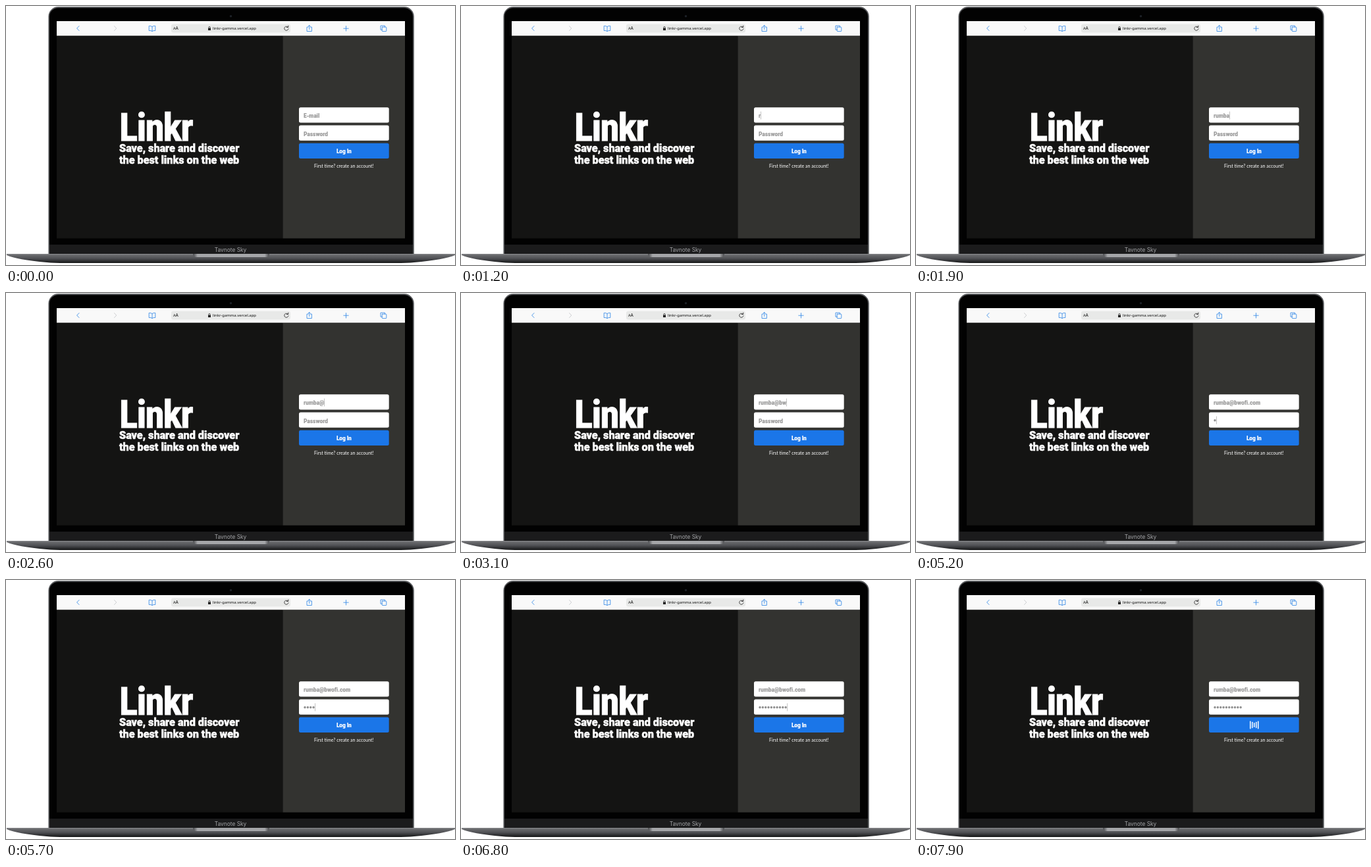
Animation, 682 px wide and 394 px high, one loop 8000 ms. Source, as an HTML page:

```html
<!DOCTYPE html>
<html lang="en">
<head>
<meta charset="utf-8">
<title>Log in</title>
<style>
  html, body { margin: 0; width: 100%; height: 100%; overflow: hidden; background: #fff; }
  svg { display: block; width: 100vw; height: 100vh; }
  .narrow { font-family: "Roboto Condensed", Roboto, sans-serif; font-stretch: 75%; font-weight: 700; }
  .title { font-size: 59px; letter-spacing: -1.8px; fill: #fff; stroke: #fff; stroke-width: .9; }
  .tagline { font: 900 16.2px Roboto, sans-serif; fill: #fff; stroke: #fff; stroke-width: .5; }
  .field { font-size: 9.7px; letter-spacing: -.1px; fill: #9b9b9b; stroke: #9b9b9b; stroke-width: .15; }
  .button { font-size: 9.7px; letter-spacing: -.2px; fill: #fff; stroke: #fff; stroke-width: .2; text-anchor: middle; }
  .link { font: 7.03px Lato, sans-serif; fill: #fff; text-anchor: middle; }
  .address { font: 500 5.95px "Noto Sans", sans-serif; fill: #111; }
  .model { font: 8.4px Inter, sans-serif; fill: #a2a3a6; text-anchor: middle; }
  .icon { fill: none; stroke: #3f8fe8; stroke-width: .9; stroke-linecap: round; stroke-linejoin: round; }
</style>
</head>
<body>
<svg viewBox="0 0 682 394">
  <defs>
    <linearGradient id="metal" x2="0" y2="1">
      <stop offset="0" stop-color="#8b8c8f"/>
      <stop offset=".15" stop-color="#67686b"/>
      <stop offset=".5" stop-color="#505155"/>
      <stop offset="1" stop-color="#141516"/>
    </linearGradient>
    <linearGradient id="notch">
      <stop offset="0" stop-color="#444548"/>
      <stop offset=".06" stop-color="#a5a6a9"/>
      <stop offset=".94" stop-color="#a5a6a9"/>
      <stop offset="1" stop-color="#444548"/>
    </linearGradient>
  </defs>

  <!-- Laptop -->
  <path d="M64.4 378V16A15 15 0 0 1 79.4 1H604.8A15 15 0 0 1 619.8 16V378Z" fill="#55575a"/>
  <path d="M66 378V16A13 13 0 0 1 79 3H605A13 13 0 0 1 618 16V378Z" fill="#020202"/>
  <rect x="66" y="363" width="552" height="14" fill="#1b1b1c"/>
  <circle cx="341.5" cy="15.5" r="1.7" fill="#1c2026"/>
  <text class="model" x="341" y="373.6">Tavnote Sky</text>
  <path d="M1 377H682V379Q666 386 620 390Q610 391 590 391H92Q72 391 62 390Q16 386 1 379Z" fill="url(#metal)"/>
  <path d="M284 377H400Q400 382 394 382H290Q284 382 284 377Z" fill="url(#notch)"/>

  <!-- Browser bar -->
  <rect x="77" y="23" width="529" height="22.5" fill="#f9f9f9"/>
  <rect x="251" y="27.5" width="181" height="13" rx="3" fill="#e8e9e8"/>
  <text class="address" x="254" y="36.3"><tspan font-size="5.6">A</tspan><tspan font-size="6.6">A</tspan></text>
  <path d="M307 33.5h4v3.5h-4z" fill="#222"/>
  <path class="icon" d="M307.8 33.5v-1a1.2 1.2 0 0 1 2.4 0v1" style="stroke:#222;stroke-width:.7"/>
  <text class="address" x="314" y="36.2">linkr-gamma.vercel.app</text>
  <path class="icon" d="M428.3 32.2A3.1 3.1 0 1 0 428.9 34.8M426.2 32.4H428.7V30" style="stroke:#333"/>
  <path class="icon" d="M111 30.5L107.6 34L111 37.5"/>
  <path class="icon" d="M164.5 30.5L167.8 34L164.5 37.5" style="stroke:#c9cbcd"/>
  <path class="icon" d="M222 31.5Q220 29.8 217.2 30.3V37.5Q220 37 222 38.5Q224 37 226.8 37.5V30.3Q224 29.8 222 31.5V38.5"/>
  <path class="icon" d="M459 32H457V38.5H464.4V32H462.4M460.7 35.5V29.5M459 31L460.7 29.3L462.4 31"/>
  <path class="icon" d="M516.5 30.5V38M512.8 34.2H520.2"/>
  <path class="icon" d="M571.2 36.2H569V30H575.5V32"/>
  <rect class="icon" x="571.2" y="32" width="6.6" height="6.6" rx=".8"/>

  <!-- Page -->
  <rect x="77" y="45.5" width="343.5" height="308" fill="#141413"/>
  <rect x="420.5" y="45.5" width="185.5" height="308" fill="#333330"/>
  <text class="narrow title" x="172" y="205">Linkr</text>
  <text class="tagline" x="172" y="222">Save, share and discover</text>
  <text class="tagline" x="172" y="239.5">the best links on the web</text>

  <rect x="445" y="154.3" width="136.7" height="23.2" rx="2.5" fill="#fff"/>
  <rect x="445" y="181.5" width="136.7" height="23.2" rx="2.5" fill="#fff"/>
  <rect x="445" y="208.7" width="136.7" height="23.2" rx="2.5" fill="#1b76e8"/>
  <text id="email" class="narrow field" x="452" y="170.3"></text>
  <text id="password" class="narrow field" x="452" y="197.5">Password</text>
  <g id="dots" fill="#8f8f8f"></g>
  <rect id="caret" width=".6" height="12" fill="#999"/>
  <text id="login" class="narrow button" x="513.3" y="224.3">Log In</text>
  <g id="loader" fill="#fff"></g>
  <text class="link" x="513.3" y="246.2">First time? create an account!</text>
</svg>

<script>
const LOOP = 8000, STEP = 100;
const ADDRESS = "rumba@bwofi.com";
const EMAIL_KEYS = [1100, 1300, 1600, 1800, 1900, 2600, 2900, 3100,
                    3300, 3400, 3700, 3900, 4100, 4400, 4400];
const PASSWORD_KEYS = [5200, 5300, 5700, 5700, 6000, 6100, 6300, 6400, 6600, 6800];
const FOCUS = 500, NEXT_FIELD = 4600, SUBMIT = 7400;
const FIELD_X = 452, DOT_PITCH = 4.35;

const $ = id => document.getElementById(id);
const [email, password, caret, login, loader] =
  ["email", "password", "caret", "login", "loader"].map($);

function add(parent, tag, attributes) {
  const node = document.createElementNS("http://www.w3.org/2000/svg", tag);
  set(node, attributes);
  parent.append(node);
  return node;
}
function set(node, attributes) {
  for (const name in attributes) node.setAttribute(name, attributes[name]);
}
const show = (node, visible) => set(node, { visibility: visible ? "visible" : "hidden" });
const pressed = (keys, t) => keys.filter(time => time <= t).length;

const dots = PASSWORD_KEYS.map((_, i) =>
  add($("dots"), "circle", { cx: FIELD_X + 2 + i * DOT_PITCH, cy: 193.8, r: 1.7 }));
const bars = [0, 1, 2, 3, 4].map(i =>
  add(loader, "rect", { x: 507 + i * 3, width: 1.5, rx: .6 }));

// Each bar shrinks steadily, then springs up; outer bars start later.
function barHeight(i, seconds) {
  const elapsed = seconds - Math.abs(i - 2) * .25;
  if (elapsed < 0) return 12;
  const phase = elapsed % 1 * 10;
  if (phase < 8) return 12 - phase;
  return phase < 9 ? 4 + (phase - 8) * 10 : 14 - (phase - 9) * 2;
}

function render(t) {
  const letters = pressed(EMAIL_KEYS, t);
  email.textContent = letters ? ADDRESS.slice(0, letters) : "E-mail";

  const count = pressed(PASSWORD_KEYS, t);
  show(password, count === 0);
  dots.forEach((dot, i) => show(dot, i < count));

  const inPassword = t >= NEXT_FIELD;
  const typedWidth = inPassword ? count * DOT_PITCH
                   : letters ? email.getComputedTextLength() : 0;
  set(caret, { x: FIELD_X + typedWidth, y: inPassword ? 187.5 : 160.5 });
  show(caret, t >= FOCUS && t < SUBMIT);

  const loading = t >= SUBMIT;
  show(login, !loading);
  show(loader, loading);
  bars.forEach((bar, i) => {
    const height = barHeight(i, Math.max(0, t - SUBMIT) / 1000);
    set(bar, { y: 220.5 - height / 2, height });
  });
}

const start = performance.now();
function frame() {
  const t = (performance.now() - start) % LOOP;
  render(Math.floor(t / STEP) * STEP);
  requestAnimationFrame(frame);
}
frame();
</script>
</body>
</html>
```
